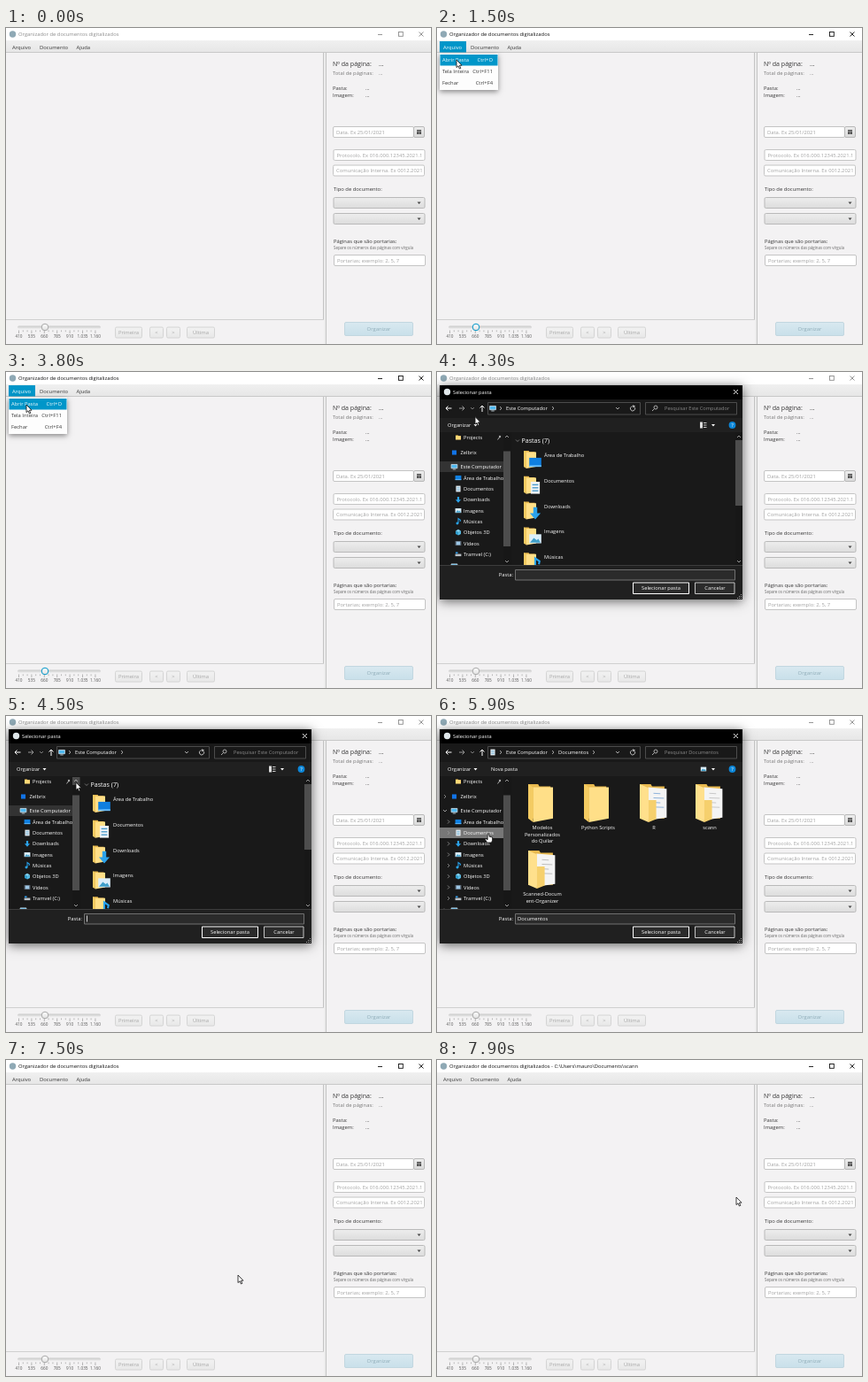
An HTML page with a canvas for the animation above (8000 ms loop, 480x357 px).

```html
<!DOCTYPE html>
<html lang="pt">
<meta charset="utf-8">
<title>Organizador</title>
<style>
html, body { margin: 0; width: 100%; height: 100%; overflow: hidden; background: #f3f2f3 }
canvas { display: block; width: 480px; height: 357px }
</style>
<canvas id="stage" width="480" height="357"></canvas>
<script>
const c = document.getElementById('stage').getContext('2d');
const LOOP = 8000, BLUE = '#0096c9';

// ---------- drawing helpers ----------
function text(s, x, y, color = '#333', size = 5.85, align = 'left') {
  c.save();
  c.translate(x, y + size * .36);
  c.scale(.1, .1); // large font scaled down keeps fractional advances
  c.font = `${size * 10}px "Open Sans", "Noto Sans", sans-serif`;
  c.textAlign = align;
  c.fillStyle = color;
  c.fillText(s, 0, 0);
  c.restore();
}
function box(x, y, w, h, fill, stroke, r = 0) {
  c.beginPath();
  c.roundRect(x, y, w, h, r);
  if (fill) { c.fillStyle = fill; c.fill(); }
  if (stroke) { c.strokeStyle = stroke; c.lineWidth = 1; c.stroke(); }
}
function dot(x, y, r, fill, stroke) { box(x - r, y - r, 2 * r, 2 * r, fill, stroke, r); }
function line(color, width, ...p) {
  c.beginPath();
  for (let i = 0; i < p.length; i += 2) c.lineTo(p[i], p[i + 1]);
  c.strokeStyle = color; c.lineWidth = width; c.stroke();
}
function poly(fill, ...p) {
  c.beginPath();
  for (let i = 0; i < p.length; i += 2) c.lineTo(p[i], p[i + 1]);
  c.closePath(); c.fillStyle = fill; c.fill();
}
function fade(y, h, a, b) {
  const g = c.createLinearGradient(0, y, 0, y + h);
  g.addColorStop(0, a); g.addColorStop(1, b);
  return g;
}
function shadowed(blur, alpha, draw) {
  c.save();
  c.shadowColor = `rgba(0,0,0,${alpha})`; c.shadowBlur = blur; c.shadowOffsetY = 2;
  draw();
  c.restore();
}
function clipped(x, y, w, h, draw) {
  c.save(); c.beginPath(); c.rect(x, y, w, h); c.clip(); draw(); c.restore();
}
const down = (x, y, color, s = 2) => poly(color, x - s, y - s / 2, x + s, y - s / 2, x, y + s * .7);
const chevron = (x, y, dx, dy, color, w = .8) => dx
  ? line(color, w, x - dx, y - 2, x + dx, y, x - dx, y + 2)
  : line(color, w, x - 2, y - dy, x, y + dy, x + 2, y - dy);

// ---------- pointer ----------
const path = [[700, 61, 48], [1000, 18, 20], [1300, 18, 20], [1500, 22, 36], [1700, 24, 60],
  [1900, 25, 50], [2100, 28, 22], [2350, 44, 22], [2650, 44, 22], [2900, 24, 20], [3100, 23, 24],
  [3400, 23, 37], [4200, 23, 37], [4450, 79, 75], [4900, 79, 75], [5350, 58, 133], [5980, 58, 133],
  [6550, 307, 110], [6950, 307, 110], [7250, 262, 243], [7500, 262, 243], [7800, 338, 155], [8000, 338, 155]];
function pointerAt(t) {
  const i = path.findIndex(p => p[0] > t);
  if (i < 1) return null;
  const [t0, x0, y0] = path[i - 1], [t1, x1, y1] = path[i];
  const k = (t - t0) / (t1 - t0), e = k * k * (3 - 2 * k);
  return { x: x0 + (x1 - x0) * e, y: y0 + (y1 - y0) * e };
}
function drawPointer(p, hand) {
  c.save();
  c.translate(p.x, p.y);
  c.beginPath();
  const pts = hand
    ? [-.8, 0, .8, 0, 1, 3.2, 4.6, 4, 4.6, 7.2, 3.6, 10, -1.4, 10, -3.6, 6.4, -3, 5.4, -.9, 6.8]
    : [0, 0, 0, 8.6, 2, 6.8, 3.4, 10, 4.8, 9.4, 3.4, 6.3, 6, 6.2];
  for (let i = 0; i < pts.length; i += 2) c.lineTo(pts[i], pts[i + 1]);
  c.closePath();
  c.fillStyle = '#fff'; c.fill();
  c.strokeStyle = '#111'; c.lineWidth = .8; c.stroke();
  c.restore();
}

// ---------- main view ----------
function field(x, y, w, hint) {
  box(x + .5, y + .5, w - 1, 12, '#fff', '#c4c4c4', 1.5);
  clipped(x + 2, y, w - 4, 13, () => text(hint, x + 4, y + 6.5, '#a0a0a0'));
}
function button(x, w, label) {
  box(x + .5, 338, w - 1, 12, fade(338, 12, '#f2f2f2', '#e8e8e8'), '#d4d4d4', 1.5);
  text(label, x + w / 2, 344, '#a5a5a5', 5.85, 'center');
}
function drawMain(t) {
  const active = t >= 1200 && t < 4200 || t >= 7400, focus = t >= 1200 && t < 4200;
  const ink = active ? '#111' : '#8c8c8c';
  box(0, 0, 480, 357, '#f3f2f3');
  box(0, 0, 480, 14, '#fff');
  dot(7.5, 7, 3.7, '#8fa9b5');
  text('Organizador de documentos digitalizados' + (t >= 7600 ? ' - C:\\Users\\mauro\\Documents\\scann' : ''), 14, 7, ink);
  line(ink, .9, 420, 7.5, 425, 7.5);
  c.strokeStyle = ink; c.strokeRect(443.5, 4.5, 4.8, 4.8);
  line(ink, .9, 466.5, 4.5, 471.5, 9.5); line(ink, .9, 471.5, 4.5, 466.5, 9.5);
  box(0, 14, 480, 14, fade(14, 14, '#f0f0f0', '#e6e6e6'));
  line('#c8c8c8', 1, 0, 27.5, 480, 27.5);

  // split panes
  line('#c4c4c4', 1, 358.5, 28, 358.5, 329);
  box(359, 28, 3, 329, '#ececec');
  line('#c4c4c4', 1, 361.5, 28, 361.5, 357);
  line('#d0d0d0', 1, 0, 329.5, 359, 329.5);

  // slider
  box(13, 336.5, 94, 3, fade(336, 3, '#c4c4c4', '#e2e2e2'), null, 1.5);
  for (let i = 0; i <= 18; i++) line('#777', .5, 14.5 + i * 4.8, 341.5, 14.5 + i * 4.8, i % 3 ? 343.2 : 345);
  ['410', '535', '660', '785', '910', '1.035', '1.160'].forEach((s, i) =>
    text(s, 14.5 + i * 14.4, 348.7, '#555', 4.7, 'center'));
  dot(44, 338, 3.8, fade(334, 8, '#fff', '#dedede'), focus ? BLUE : '#a8a8a8');
  button(123, 31, 'Primeira'); button(162, 16, '<'); button(181, 16, '>'); button(204, 32, 'Última');

  // side panel
  text('Nº da página:', 369, 40.5, '#333', 7.05); text('...', 421, 40.5, '#333', 7.05);
  text('Total de páginas:', 369, 51, '#777'); text('...', 421, 51, '#777');
  text('Pasta:', 369, 67.5); text('...', 406, 67.5);
  text('Imagem:', 369, 76); text('...', 406, 76);
  field(369, 111, 92, 'Data. Ex 25/01/2021');
  box(460.5, 111.5, 12, 12, fade(111, 13, '#eee', '#d8d8d8'), '#b9b9b9', 1.5);
  box(464, 115, 5, 5, '#555');
  line('#ddd', .5, 464, 116.8, 469, 116.8); line('#aaa', .5, 466.5, 117, 466.5, 120);
  field(369.5, 137, 104, 'Protocolo. Ex 016.000.12345.2021.1');
  field(369, 154.5, 104, 'Comunicação Interna. Ex 0012.2021');
  text('Tipo de documento:', 370, 181.5);
  for (const y of [191, 209]) {
    box(370, y + .5, 103, 12, fade(y, 13, '#eee', '#dcdcdc'), '#b9b9b9', 1.5);
    down(466.5, y + 6.5, '#444');
  }
  text('Páginas que são portarias:', 370, 240.5, '#333', 5.8);
  text('Separe os números das páginas com vírgula', 370, 248, '#666', 4.4);
  field(370, 256, 104, 'Portarias; exemplo: 2, 5, 7');
  box(382.5, 332.5, 77, 15, fade(332, 15, '#d9e9f0', '#c9e0ea'), '#c2d7e0', 1.5);
  text('Organizar', 421, 340, '#8eabb7', 5.85, 'center');
}

// ---------- menus ----------
const menus = {
  file: { x: 3, head: 30, w: 66, pad: 3, items: [['Abrir Pasta', 'Ctrl+O'], ['Tela Inteira', 'Ctrl+F11'], ['Fechar', 'Ctrl+F4']] },
  doc: { x: 34, head: 40, w: 90, pad: 10.5, items: [['Auto Detectar', 'Ctrl+A'], ['Documento Antigo', ''], ['Texto Extraído', 'Ctrl+T']] }
};
function drawMenus(t, p) {
  const lit = t < 900 || t >= 4150 ? null : t >= 2250 && t < 2800 ? 'doc' : 'file';
  if (lit) box(menus[lit].x, 15, menus[lit].head, 12.5, BLUE);
  text('Arquivo', 7, 21.5, lit === 'file' ? '#fff' : '#333');
  text('Documento', 38, 21.5, lit === 'doc' ? '#fff' : '#333');
  text('Ajuda', 79.5, 21.5);
  if (!lit || t < 1200) return;
  const m = menus[lit];
  shadowed(6, .45, () => box(m.x, 29, m.w, 41, '#fdfdfd'));
  m.items.forEach(([name, key], i) => {
    const y = 36.3 + i * 12.8, on = Math.abs(p.y - y) < 6.4, ink = on ? '#fff' : '#333';
    if (on) box(m.x + .5, y - 6.2, m.w - 1, 12.4, BLUE);
    text(name, m.x + m.pad, y, ink);
    text(key, m.x + m.w - 6, y, ink, 5.85, 'right');
  });
  if (lit === 'doc') line('#333', 1.1, 37.8, 36.5, 39.3, 38.3, 42, 34);
}

// ---------- folder dialog ----------
function folder(x, y, w, h, papers) {
  poly('#e8b94f', x, y, x + w * .4, y, x + w * .45, y + h * .06, x + w * .9, y + h * .06, x + w * .9, y + h * .9, x, y + h * .9);
  if (papers) {
    poly('#f4f4f4', x + w * .3, y + h * .08, x + w * .98, y + h * .12, x + w * .98, y + h * .88, x + w * .3, y + h * .95);
    for (let i = 0; i < 4; i++)
      line(papers, .6, x + w * .5, y + h * (.24 + i * .12), x + w * (.75 + i % 2 * .13), y + h * (.25 + i * .12));
    poly('#ffe08c', x, y, x + w * .32, y + h * .1, x + w * .32, y + h, x, y + h * .9);
    poly('#f6d06d', x + w * .32, y + h * .42, x + w * .6, y + h * .42, x + w * .6, y + h * .92, x + w * .32, y + h);
  } else {
    poly('#ffdf88', x + w * .2, y + h * .08, x + w, y + h * .08, x + w, y + h * .9, x + w * .2, y + h);
    poly('#f4cb62', x, y, x + w * .2, y + h * .08, x + w * .2, y + h, x, y + h * .9);
  }
}
const icons = {
  folder() { box(-3.5, -3, 3.5, 2, '#e8b94f'); box(-3.5, -2.2, 7, 5.2, '#ffd977'); },
  cloud() { box(-3, -3, 6, 6, '#1273e6'); },
  pc() { box(-4, -3, 8, 5, '#4fb9f0', '#c9dbe6'); line('#c9dbe6', 1, -2, 3.5, 2, 3.5); },
  desk() { box(-4, -3, 8, 6, '#0f7fe0'); line('#6fc3ff', 1, -4, 2.5, 4, 2.5); },
  docs() { box(-3, -4, 6, 8, '#eef3f6'); for (const y of [-2, 0, 2]) line('#4a9ac9', .8, -2, y, 2, y); },
  load() { poly('#2ba2ea', -1.3, -4, 1.3, -4, 1.3, 0, 3.6, 0, 0, 4, -3.6, 0, -1.3, 0); },
  pics() { box(-4, -3, 8, 6, '#dceefa'); poly('#3f9fc9', -3.5, 2.5, -1, -.5, 1, 1, 2, 0, 3.5, 2.5); },
  music() { dot(-1.2, 2.4, 1.7, '#28a4f0'); line('#28a4f0', 1.2, 0, 2.4, 0, -4, 2.8, -2, 2.4, 0); },
  cube() {
    poly('#7fd3f5', 0, -4, 3.5, -2, 0, 0, -3.5, -2);
    poly('#2f9fd0', -3.5, -2, 0, 0, 0, 4, -3.5, 2);
    poly('#58bde6', 3.5, -2, 0, 0, 0, 4, 3.5, 2);
  },
  video() { box(-4, -3, 8, 6, '#5a6470'); box(-2.6, -2.2, 5.2, 4.4, '#9cc7e6'); },
  drive() { box(-4, -.5, 8, 3, '#b9c0c6'); box(-3.5, -3, 3, 2, '#2f9be8'); }
};
function icon(kind, x, y, s = 1) {
  c.save(); c.translate(x, y); c.scale(s, s);
  icons[kind]();
  c.restore();
}
const tree = [['Projects', 74, 'folder'], ['Zelbrix', 91, 'cloud', 1], ['Este Computador', 107, 'pc', 1],
  ['Área de Trabalho', 119.5, 'desk'], ['Documentos', 132, 'docs'], ['Downloads', 144.3, 'load'],
  ['Imagens', 156.6, 'pics'], ['Músicas', 169, 'music'], ['Objetos 3D', 181.2, 'cube'],
  ['Vídeos', 193.5, 'video'], ['Tramvel (C:)', 206, 'drive'], ['Rede', 219.5, 'pc', 1]];
const tiles = [[['Modelos', 'Personalizados', 'do Quilar']], [['Python Scripts']],
  [['R'], '#4a86c8'], [['scann'], '#aaa'], [['Scanned-Docum', 'ent-Organizer'], '#999']];

function drawTree(t, p, inDocs) {
  clipped(3, 68, 72, 150, () => tree.forEach(([name, y, kind, top], i) => {
    const over = p.x < 75 && Math.abs(p.y - y) < 6.2, chosen = i === (inDocs ? 4 : 2);
    if (chosen || over) box(3, y - 6, 72, 12, chosen && over ? '#777' : chosen ? (inDocs ? '#555' : '#333') : '#4d4d4d');
    icon(kind, top ? 19.5 : 24, y, .85);
    text(name, top ? 26.5 : 30, y, '#fff', 5.7);
    if (t >= 4900 && i) i === 2 ? chevron(9, y, 0, 1, '#bbb') : chevron(top ? 9 : 13, y, 1, 0, '#999');
  }));
  line('#aaa', 1, 68.5, 76.5, 71.5, 72.5); dot(71, 73, 1.2, '#aaa');
  box(75, 68, 8.5, 150, '#171717');
  if (p.x > 75 && p.x < 83 && p.y < 80) box(75, 69, 8.5, 9, '#4a4a4a');
  box(75, 89.5, 8, 107.5, '#4d4d4d');
  chevron(79, 73, 0, -1, '#bbb'); chevron(79, 214, 0, 1, '#bbb');
}
function drawPlaces() {
  chevron(91, 77.5, 0, 1, '#888');
  text('Pastas (7)', 95.5, 77.5, '#fff', 7.1);
  clipped(84, 68, 253, 150, () => [3, 4, 5, 6, 7].forEach((n, i) => {
    const y = 94 + i * 28.8;
    folder(98, y - 5, 14, 20);
    icon(tree[n][2], 111, y + 8, 1.7);
    text(tree[n][0], 121, y, '#fff', 5.7);
  }));
  box(337, 68, 8, 150, '#171717');
  box(337, 77, 8, 74, '#4d4d4d');
  chevron(341, 73, 0, -1, '#bbb'); chevron(341, 214, 0, 1, '#bbb');
}
function drawTiles(t, p) {
  tiles.forEach(([label, papers], i) => {
    const x = 119 + i % 4 * 63, y = i < 4 ? 72 : 147;
    const over = Math.abs(p.x - x) < 27 && p.y > y && p.y < y + 58, chosen = i === 3 && t >= 6900;
    if (over || chosen) box(x - 27, y, 54, 58, chosen ? (over ? '#777' : '#555') : '#333');
    folder(x - 16, y + 5, papers ? 31 : 28, 43, papers);
    label.forEach((s, j) => text(s, x, y + 54 + j * 7.6, '#fff', 5.7, 'center'));
  });
}
function drawDialog(t, p) {
  const inDocs = t >= 5700, white = '#fff';
  shadowed(12, .6, () => box(3, 15, 342, 242, '#191919'));
  box(3, 15, 342, 16, '#000');
  dot(11.5, 22.5, 3.7, '#dfe6e9');
  text('Selecionar pasta', 18, 22.8, white, 5.7);
  line(white, .9, 335, 20, 340, 25); line(white, .9, 340, 20, 335, 25);

  // navigation
  line(white, 1, 16.5, 41, 10, 41); line(white, 1, 12.5, 38.5, 10, 41, 12.5, 43.5);
  line('#999', 1, 25, 41, 31, 41); line('#999', 1, 28.5, 38.5, 31, 41, 28.5, 43.5);
  chevron(40, 41, 0, .8, '#999');
  line(white, 1, 51, 45, 51, 38); line(white, 1, 48.5, 40.5, 51, 38, 53.5, 40.5);
  box(57.5, 34.5, 172, 13.5, '#191919', '#4c4c4c');
  icon(inDocs ? 'docs' : 'pc', 63, 41, .85);
  chevron(72, 41, .8, 0, '#ccc');
  const short = t >= 6400;
  text('Este Computa' + (short ? '...' : 'dor'), 78, 41, white, 5.75);
  chevron(short ? 126.5 : 131, 41, .8, 0, '#ccc');
  if (inDocs) {
    const x = short ? 132 : 137;
    text('Documentos', x, 41, white, 5.75);
    chevron(x + 40, 41, .8, 0, '#ccc');
  }
  chevron(204, 41, 0, 1, '#ccc');
  c.beginPath(); c.arc(221, 41.3, 2.6, -.6, 4.6); c.strokeStyle = '#ccc'; c.lineWidth = .9; c.stroke();
  poly('#ccc', 221, 37.2, 224, 38.6, 221.5, 40.5);
  box(235.5, 34.5, 103, 13.5, '#191919', '#4c4c4c');
  dot(247, 40, 2, null, '#aaa'); line('#aaa', 1, 245.5, 41.5, 243, 44);
  text('Pesquisar ' + (inDocs ? 'Documentos' : 'Este Computador'), 257, 41, '#8b8b8b', 5.65);

  // toolbar
  box(3, 52, 342, 16, '#202020');
  text('Organizar', 12, 60, white, 5.75); down(43.5, 60, white);
  if (inDocs) { text('Nova pasta', 61, 60, white, 5.75); icon('pics', 301, 60, .8); }
  else { box(297, 56.5, 3, 7, '#ddd'); for (const y of [57.5, 60, 62.5]) line('#ddd', .9, 301, y, 304.5, y); }
  down(312, 60, white);
  dot(333.5, 60, 3.9, '#0c86d8'); text('?', 333.5, 60, white, 6, 'center');

  drawTree(t, p, inDocs);
  inDocs ? drawTiles(t, p) : drawPlaces();

  // footer
  box(3, 218, 342, 39, '#202020');
  line('#3c3c3c', 1, 3, 218.5, 345, 218.5);
  text('Pasta:', 86, 229.3, white, 5.75, 'right');
  box(88.5, 223.5, 248, 11.5, '#2b2b2b', '#707070');
  if (inDocs) text(t >= 6900 ? 'scann' : 'Documentos', 91, 229, white, 5.75);
  else if (Math.floor(t / 500) % 2) line(white, .8, 91.5, 225.5, 91.5, 232.5);
  const over = p.y > 238 && p.x > 221 && p.x < 285;
  box(221.5, 238, 63, 12.5, over ? '#555' : '#2b2b2b', white);
  text('Selecionar pasta', 253, 244.2, white, 5.75, 'center');
  box(291.5, 238, 44.5, 12.5, '#2b2b2b', '#c4c4c4');
  text('Cancelar', 314, 244.2, white, 5.75, 'center');
  for (let i = 0; i < 3; i++) for (let j = 0; j <= i; j++) box(343 - j * 2, 251 + i * 2, 1, 1, '#aaa');
}

function frame(now) {
  const t = now % LOOP, p = pointerAt(t);
  drawMain(t);
  drawMenus(t, p);
  if (t >= 4200 && t < 7400) drawDialog(t, p);
  if (p) drawPointer(p, t >= 5350 && t < 6000);
  requestAnimationFrame(frame);
}
requestAnimationFrame(frame);
</script>
</html>
```
